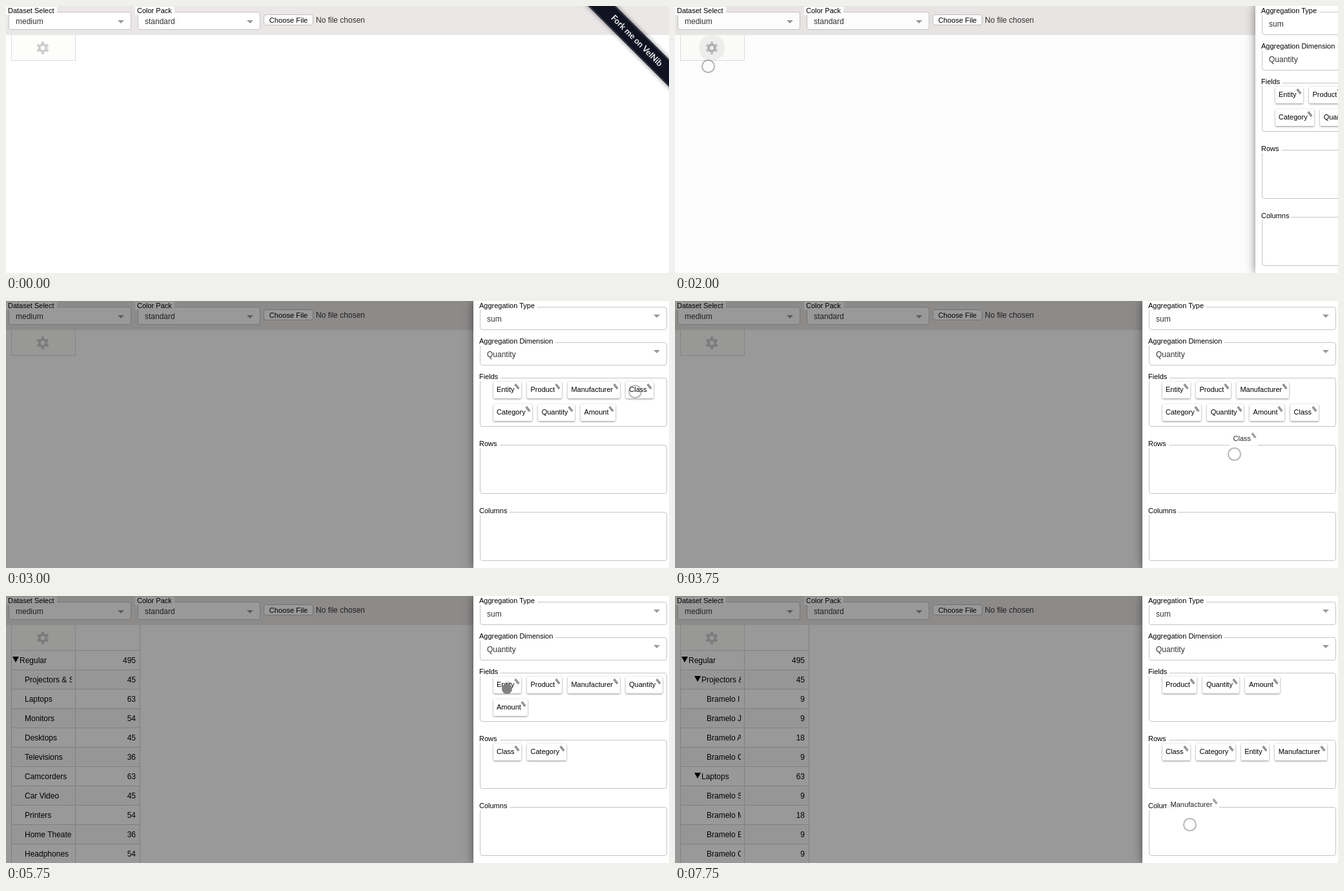
Recreate the animation shown at these times as an HTML page. Size 1027x414 px, loop 8 s.

```html
<!DOCTYPE html>
<html lang="en">
<head>
<meta charset="utf-8">
<title>Pivot table drag and drop</title>
<style>
  html, body { margin: 0; width: 100%; height: 100%; overflow: hidden; background: #fff; }
  #stage { position: relative; width: 1027px; height: 414px; overflow: hidden;
    font: 12px/14px "Liberation Sans", Arial, sans-serif; color: #333; }
  #stage div, #stage svg, #stage span { position: absolute; box-sizing: border-box; white-space: nowrap; }
  #bar { left: 0; top: 0; width: 1027px; height: 45px; background: #ebe7e6; }
  .box { background: #fff; border: 1px solid #c4c4c4; border-radius: 4px; }
  .legend { font-size: 11px; line-height: 13px; color: #000; background: #fff; padding: 0 4px 0 3px; }
  .arrow { border: 5px solid transparent; border-top-color: #999; border-bottom: 0; }
  #file { left: 399px; top: 13px; width: 77px; height: 17px; border: 1px solid #bdbdbd; border-radius: 4px;
    background: #fff; color: #000; font-size: 11.2px; line-height: 16px; text-align: center; }
  #ribbon { left: 874px; top: 39px; width: 206px; height: 30px; transform: rotate(45deg); background: #121322;
    box-shadow: 0 0 7px rgba(0, 0, 0, .55); color: #eee; text-align: center;
    font: bold 13px/29px Lato, "Open Sans", sans-serif; }
  #ribbon::before { content: ""; position: absolute; inset: 1px 0; border: solid #3b4350; border-width: 1px 0; }
  #gearCell { left: 8px; top: 45px; width: 100px; height: 40px; border: 1px solid #dcdcdc; border-top: 0; background: #fdfdfb; }
  #gear { left: 47px; top: 55px; }
  #ripple { left: 37px; top: 45px; width: 40px; height: 40px; border-radius: 50%; background: rgba(0, 0, 0, .07); }
  .cell { height: 30px; border: solid #d3d3d3; border-width: 0 1px 1px 0; color: #000; }
  .cell span { top: 8px; overflow: hidden; }
  .fold { border: 5px solid transparent; border-top: 9px solid #000; border-bottom: 0; }
  #shade { inset: 0; background: #000; }
  #panel { top: 0; width: 303px; height: 414px; background: #fff; box-shadow: 0 0 14px rgba(0, 0, 0, .5); }
  #stage .chips { left: 30.5px; width: 264.5px; display: flex; flex-wrap: wrap; gap: 9px; }
  #stage .chip { position: relative; height: 26px; padding: 0 10.5px 0 5.5px; background: #fff; color: #000;
    border-radius: 2px; font-size: 11px; line-height: 25px; box-shadow: 0 1px 3px rgba(0, 0, 0, .45); }
  .chip::after { content: ""; position: absolute; right: 2px; top: 6px; width: 9px; height: 3px;
    background: #bbb; border: solid #777; border-width: 1px 0; box-sizing: border-box; transform: rotate(52deg); }
  #stage .ghost { position: absolute; box-shadow: none; opacity: .85; }
  #cursor { width: 21px; height: 21px; border-radius: 50%; border: 2px solid rgba(90, 90, 90, .45); }
  #cursor.down { width: 16px; height: 16px; margin: 2px; border: 0; background: #808080; }
</style>
</head>
<body>
<div id="stage">
  <div id="bar"></div>
  <div id="selects"></div>
  <div id="file">Choose File</div>
  <span style="left:480px;top:15px">No file chosen</span>
  <div id="ribbon">Fork me on VelNib</div>
  <div id="gearCell"></div>
  <div id="table"></div>
  <svg id="gear" width="20" height="20" viewBox="-10 -10 20 20" fill="none" stroke="#ccc">
    <circle r="5.2" stroke-width="3.6"/>
    <circle r="8.1" stroke-width="3.2" pathLength="6" stroke-dasharray=".5 .5" stroke-dashoffset="-.25"/>
  </svg>
  <div id="ripple"></div>
  <div id="shade"></div>
  <div id="panel"></div>
  <div id="drag"></div>
  <div id="cursor"></div>
</div>
<script>
const STEP = 250, LOOP = 8000;
const $ = id => document.getElementById(id);
const at = (x, y, w, h) =>
  `left:${x}px;top:${y}px;` + (w ? `width:${w}px;` : '') + (h ? `height:${h}px;` : '');

const legend = (x, y, text) => `<div class="legend" style="${at(x, y)}">${text}</div>`;
const frame = (x, y, w, h, title) =>
  `<div class="box" style="${at(x, y, w, h)}"></div>` + legend(x - 4, y - 8, title);
const select = (x, y, w, h, title, value) => frame(x, y, w, h, title) +
  `<span style="${at(x + 11, y + h / 2 - 6)}">${value}</span>` +
  `<div class="arrow" style="${at(x + w - 21, y + (h === 28 ? 13 : 12))}"></div>`;
const chip = name => `<div class="chip">${name}</div>`;
const group = (y, title, names) => frame(10, y, 290, 76, title) +
  `<div class="chips" style="top:${y + 6}px">${names.map(chip).join('')}</div>`;

// Step, x, y, and whether the button shows as pressed.
const pointer = [
  [3, 41, 24], [4, 50, 45], [5, 56, 66, 1], [6, 56, 68], [7, 51, 93], [9, 314, 109],
  [10, 640, 122], [11, 880, 132], [12, 974, 140], [13, 974, 143, 1], [14, 930, 185],
  [15, 866, 237], [16, 812, 265], [17, 802, 274, 1], [18, 785, 215], [19, 788, 182, 1],
  [20, 812, 266], [21, 818, 270, 1], [22, 788, 190], [23, 776, 144, 1], [24, 815, 205],
  [25, 878, 262], [26, 896, 271, 1], [27, 885, 205], [28, 874, 150], [29, 868, 190],
  [30, 835, 275], [31, 797, 354]
];

// First step, last step, field, ghost offset from the pointer.
const drags = [
  [14, 16, 'Class', -7, -36],
  [20, 20, 'Category', -28, -40],
  [24, 25, 'Entity', -20, -38],
  [29, 31, 'Manufacturer', -35, -43]
];

const fieldSteps = [
  [0, 'Entity Product Manufacturer Class Category Quantity Amount'],
  [14, 'Entity Product Manufacturer Category Quantity Amount Class'],
  [16, 'Entity Product Manufacturer Category Quantity Amount'],
  [20, 'Entity Product Manufacturer Quantity Amount'],
  [25, 'Product Manufacturer Quantity Amount'],
  [30, 'Product Quantity Amount']
];
const rowSteps = [
  [0, ''], [16, 'Class'], [20, 'Class Category'],
  [25, 'Class Category Entity'], [30, 'Class Category Entity Manufacturer']
];

// Each entry: label, value, depth, open.
const leaf = depth => ([label, value]) => [label, value, depth, false];
const brand = list => list.map(([letter, value]) => leaf(2)(['Bramelo ' + letter, value]));
const total = ['Regular', 495, 0, true];
const tableSteps = [
  [0, []],
  [17, [['Economy', 312], ['Deluxe', 54], ['Regular', 495]].map(leaf(0))],
  [21, [total, ...[['Projectors &amp; Screens', 45], ['Laptops', 63], ['Monitors', 54], ['Desktops', 45],
    ['Televisions', 36], ['Camcorders', 63], ['Car Video', 45], ['Printers', 54],
    ['Home Theater', 36], ['Headphones', 54]].map(leaf(1))]],
  [26, [total,
    ['Projectors &amp; Screens', 45, 1, true], ...brand([['I', 9], ['J', 9], ['A', 18], ['C', 9]]),
    ['Laptops', 63, 1, true], ...brand([['S', 9], ['M', 18], ['E', 9], ['C', 9]])]]
];

const latest = (steps, now) => steps.filter(s => s[0] <= now).pop();
const words = text => text.split(' ').filter(Boolean);

function tableRow([label, value, depth, open], i) {
  const y = 85 + i * 30, indent = 1 + depth * 20, x = indent + (open ? 12 : 0);
  const tint = i % 2 ? 'background:#fafafa' : '';
  return `<div class="cell" style="${at(8, y, 100, 30)}border-left-width:1px;${tint}">` +
    (open ? `<div class="fold" style="${at(indent, 9)}"></div>` : '') +
    `<span style="${at(x - 1, 8, 94 - x)}">${label}</span></div>` +
    `<div class="cell" style="${at(108, y, 100, 30)}${tint}"><span style="right:6px">${value}</span></div>`;
}

function draw(now) {
  const entries = latest(tableSteps, now)[1];
  $('table').innerHTML = (entries.length ? `<div class="cell" style="${at(108, 45, 100, 40)}"></div>` : '') +
    entries.map(tableRow).join('');

  const opening = now === 8;
  $('ripple').hidden = now < 6 || now > 9;
  $('ripple').style.boxShadow = opening || now === 7 ? 'inset 0 0 0 14px rgba(255,255,255,.25)' : '';
  $('ripple').style.display = $('ripple').hidden ? 'none' : '';
  $('gear').setAttribute('stroke', now === 7 || opening ? '#b5b5b5' : '#ccc');
  $('shade').style.opacity = now < 8 ? 0 : opening ? .012 : .4;
  $('panel').style.display = now < 8 ? 'none' : '';
  $('panel').style.left = (opening ? 899 : 724) + 'px';
  $('panel').innerHTML =
    select(10, 9, 290, 36, 'Aggregation Type', 'sum') +
    select(10, 64, 290, 36, 'Aggregation Dimension', 'Quantity') +
    group(119, 'Fields', words(latest(fieldSteps, now)[1])) +
    group(223, 'Rows', words(latest(rowSteps, now)[1])) +
    group(327, 'Columns', []);

  const spot = latest(pointer, now);
  const cursor = $('cursor');
  cursor.style.display = spot ? '' : 'none';
  $('drag').innerHTML = '';
  if (!spot) return;
  const [, x, y, down] = spot;
  cursor.className = down ? 'down' : '';
  cursor.style.left = x - 10 + 'px';
  cursor.style.top = y - 10 + 'px';
  const drag = drags.find(([from, to]) => now >= from && now <= to);
  if (drag) {
    const [, , name, dx, dy] = drag;
    $('drag').innerHTML = `<div class="chip ghost" style="${at(x + dx, y + dy)}">${name}</div>`;
  }
}

$('selects').innerHTML =
  select(4, 9, 190, 28, 'Dataset Select', 'medium') +
  select(204, 9, 190, 28, 'Color Pack', 'standard');

const start = performance.now();
let shown = -1;
function tick() {
  const now = Math.floor((performance.now() - start) % LOOP / STEP);
  if (now !== shown) draw(shown = now);
  requestAnimationFrame(tick);
}
tick();
</script>
</body>
</html>
```
